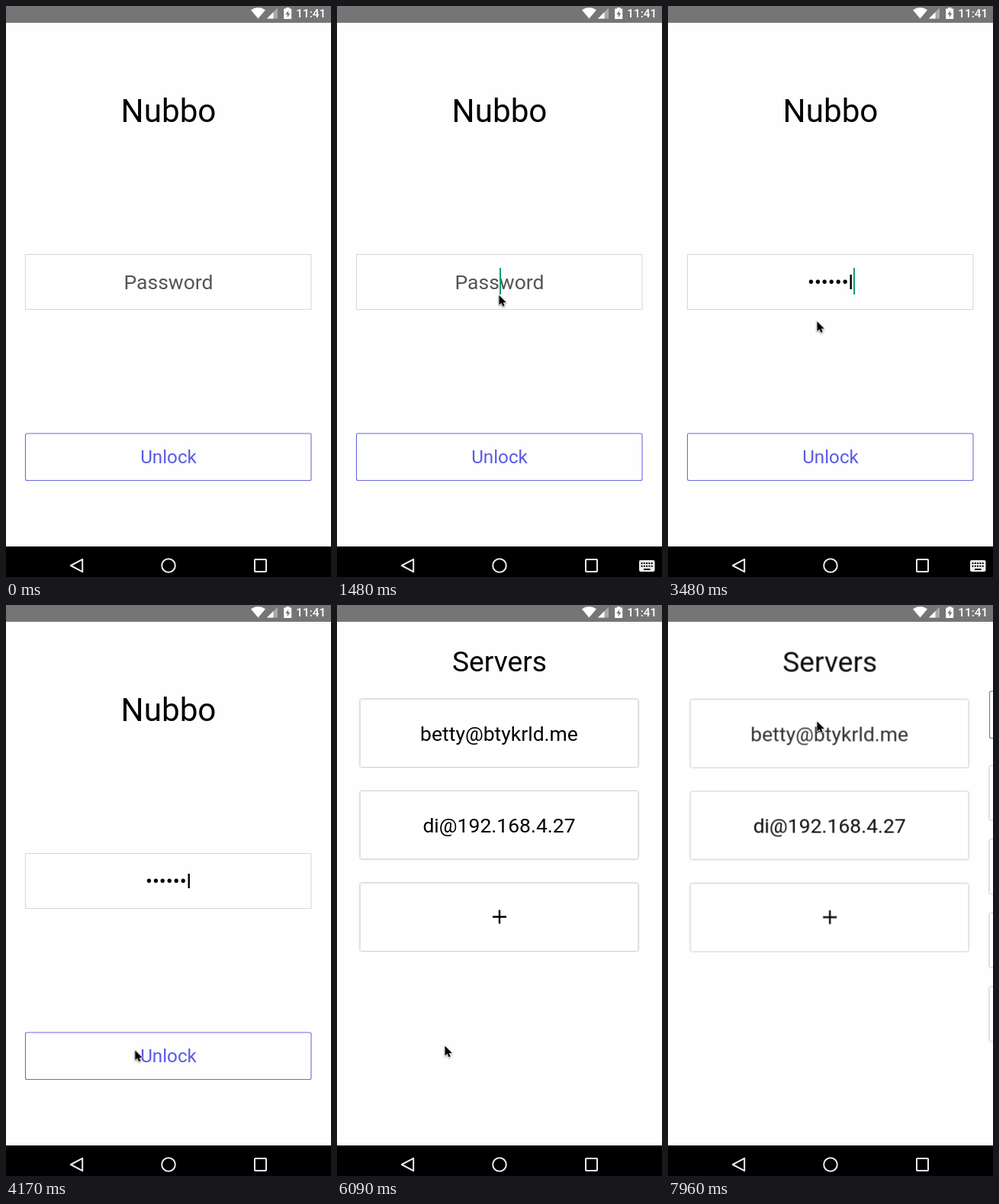
An HTML page that plays this animation: 426 by 748 pixels, repeating every 8 s.

```html
<!DOCTYPE html>
<html lang="en">
<head>
<meta charset="utf-8">
<title>Unlock and servers</title>
<style>
  html, body { margin: 0; width: 100%; height: 100%; overflow: hidden; background: #fefefe; }
  body { position: relative; font-family: Roboto, "Open Sans", sans-serif; }
  svg { position: absolute; left: 0; top: 0; width: 426px; height: 748px; overflow: hidden; }
  text { text-anchor: middle; font-size: 26.5px; }
  .card { fill: #fff; filter: drop-shadow(0 .9px 1.1px rgba(0, 0, 0, .5)); }
  .outline { fill: none; stroke: #6a6ae2; stroke-width: 1.1; }
  .nav { fill: none; stroke: #ececec; stroke-width: 2; }

  #entry div {
    position: absolute; left: 0; top: 326px; width: 426px;
    font-size: 26.5px; line-height: 72px; text-align: center;
  }
  #entry span { position: relative; display: inline-block; height: 72px; white-space: pre; }
  #entry i {
    position: absolute; left: 100%; top: 17px; width: 2px; height: 35px;
    background: #12a17d;
  }

  #pointer { animation: move 8s ease-in-out infinite; }
  #press { animation: press 8s linear infinite; }
  #servers { animation: leave 8s linear infinite; }
  #next { animation: enter 8s linear infinite; }
  #tapped { animation: tap 8s linear infinite; }

  @keyframes move {
    0%, .5%  { transform: translate(222px, 711px); animation-timing-function: ease-out; }
    10.375%  { transform: translate(213px, 454px); }
    15.6%    { transform: translate(212px, 379px); }
    27.125%  { transform: translate(211px, 373px); }
    37%      { transform: translate(210px, 375px); }
    41.25%   { transform: translate(204px, 388px); animation-timing-function: ease-in; }
    43.5%    { transform: translate(195px, 412px); animation-timing-function: ease-out; }
    49.4%    { transform: translate(169px, 583px); }
    59.25%, 66.25% { transform: translate(167px, 582px); }
    71.75%, 74.5%  { transform: translate(139.5px, 577px); }
    76.125%, 81.5% { transform: translate(141px, 577px); }
    83.125%, 85.375% { transform: translate(140px, 577px); }
    94%, 100% { transform: translate(195px, 152px); }
  }
  @keyframes press {
    0%, 52.4% { opacity: 1; }
    53.8%, 54.6% { opacity: .3; }
    55.6%, 100% { opacity: .8; }
  }
  @keyframes leave {
    0%, 98.5% { transform: translate(0, 0); opacity: 1; }
    99.5%, 100% { transform: translate(-.8px, .5px); opacity: .95; }
  }
  @keyframes enter {
    0%, 98.5% { transform: translateX(426px); }
    99.5%, 100% { transform: translateX(396px); }
  }
  @keyframes tap {
    0%, 98.2% { opacity: 1; }
    99.5%, 100% { opacity: .85; }
  }
</style>
<style id="cuts"></style>
</head>
<body>
<svg viewBox="0 0 426 748">
  <rect width="426" height="748" fill="#fefefe"/>

  <g id="login">
    <text x="213" y="152" style="font-size:42.2px">Nubbo</text>
    <rect x="25.5" y="325.5" width="374.5" height="72" fill="none" stroke="#d9d9d9" stroke-width="1.1"/>
    <text id="hint" x="213" y="371" fill="#555">Password</text>
    <g id="press">
      <rect class="outline" x="25.5" y="560" width="374.5" height="61.5" rx="2"/>
      <text x="213" y="599" fill="#5a5ae6" style="font-size:24.2px">Unlock</text>
    </g>
  </g>

  <g id="list">
    <g id="servers">
      <text x="213" y="87" style="font-size:37.2px">Servers</text>
      <rect class="card" x="30.5" y="123.5" width="364" height="88.5" rx="1.5"/>
      <text id="tapped" x="212.5" y="178">betty@btykrld.me</text>
      <rect class="card" x="30.5" y="244" width="364" height="88.5" rx="1.5"/>
      <text x="212.5" y="298">di@192.168.4.27</text>
      <rect class="card" x="30.5" y="364.5" width="364" height="88.5" rx="1.5"/>
      <path d="M204 408.5h18M213 399.5v18" stroke="#000" stroke-width="2.4"/>
    </g>
    <g id="next">
      <rect width="426" height="748" fill="#fefefe"/>
      <rect class="outline" x="25.5" y="113" width="374.5" height="61.5" rx="2"/>
      <rect class="card" x="25.5" y="211" width="374.5" height="70.5" rx="1.5"/>
      <rect class="card" x="25.5" y="307.5" width="374.5" height="70.5" rx="1.5"/>
      <rect class="card" x="25.5" y="404" width="374.5" height="70.5" rx="1.5"/>
      <rect class="card" x="25.5" y="500.5" width="374.5" height="70.5" rx="1.5"/>
    </g>
  </g>

  <rect width="426" height="22" fill="#757575"/>
  <g fill="#fff">
    <path d="M330.5 16.5L321 5.2Q330.5 -1.2 340 5.2Z"/>
    <path d="M342 16.5L356 2.5V16.5Z" opacity=".38"/>
    <path d="M342 16.5L350.5 8V16.5Z"/>
    <path d="M367 2h4.5v1.5h2.7v13.5h-10v-13.5h2.8Z"/>
    <path d="M370.5 5.5L366.3 11h2.5v4.2L372.3 9.4h-2.6Z" fill="#757575"/>
    <text x="399.7" y="15" style="font-size:15.4px;font-weight:500">11:41</text>
  </g>

  <rect y="708" width="426" height="40" fill="#000"/>
  <g class="nav">
    <path d="M84.8 733L100.2 724.8V741.2Z" stroke-linejoin="round"/>
    <circle cx="213" cy="733" r="8.8"/>
    <rect x="326" y="725" width="15" height="16" rx=".8"/>
  </g>
  <g id="keys">
    <rect x="396" y="726" width="20.5" height="15" rx="2" fill="#eee"/>
    <path d="M398.5 730h16M398.5 733.8h16" stroke="#000" stroke-width="2" stroke-dasharray="2 1.3"/>
    <path d="M402 738h8.5" stroke="#000" stroke-width="2"/>
  </g>
</svg>

<div id="entry"></div>

<svg viewBox="0 0 426 748">
  <g id="arrow">
    <g id="pointer" style="filter:drop-shadow(0 1px 1px rgba(0,0,0,.4))">
      <path d="M.5 .5V13.5L3.5 10.8L5.5 15.3L7.8 14.3L5.9 9.9H9.9Z"
            stroke="#fff" stroke-width="1.4" paint-order="stroke" stroke-linejoin="round"/>
    </g>
  </g>
</svg>

<script>
  const LOOP = 8000;
  const byId = id => document.getElementById(id);
  let cuts = "";

  // Visible from one time to another, with hard cuts.
  function show(el, from, to) {
    const name = "show-" + el.id;
    const stops = [[from, 1]];
    if (from > 0) stops.unshift([0, 0]);
    if (to < LOOP) stops.push([to, 0]);
    stops.push([LOOP, to < LOOP ? 0 : 1]);
    const rules = stops.map(([time, alpha]) => `${time * 100 / LOOP}% { opacity: ${alpha}; }`);
    cuts += `@keyframes ${name} { ${rules.join(" ")} }
      #${el.id} { animation: ${name} ${LOOP}ms step-end infinite; }\n`;
  }

  // One centred line of the password field, with its caret.
  function addLine(text, from, to, caretEnd) {
    const line = document.createElement("div");
    const span = document.createElement("span");
    const caret = document.createElement("i");
    line.id = "line" + from;
    caret.id = "caret" + from;
    span.textContent = text;
    span.append(caret);
    line.append(span);
    byId("entry").append(line);
    show(line, from, to);
    show(caret, from, caretEnd);
  }

  const focus = 1330, blur = 4040, unlock = 4450, blink = 500;
  const letters = "nobreal";
  const typed = [2080, 2310, 2530, 2740, 2950, 3170, 3420];

  show(byId("login"), 0, unlock);
  show(byId("list"), unlock, LOOP);
  show(byId("hint"), 0, typed[0]);
  show(byId("keys"), focus + 100, blur);
  show(byId("arrow"), 40, LOOP);

  addLine("", focus, typed[0], focus + blink);
  typed.forEach((time, i) => {
    const end = typed[i + 1] || unlock;
    addLine("•".repeat(i) + letters[i], time, end, Math.min(end, time + blink));
  });

  byId("cuts").textContent = cuts;
</script>
</body>
</html>
```
